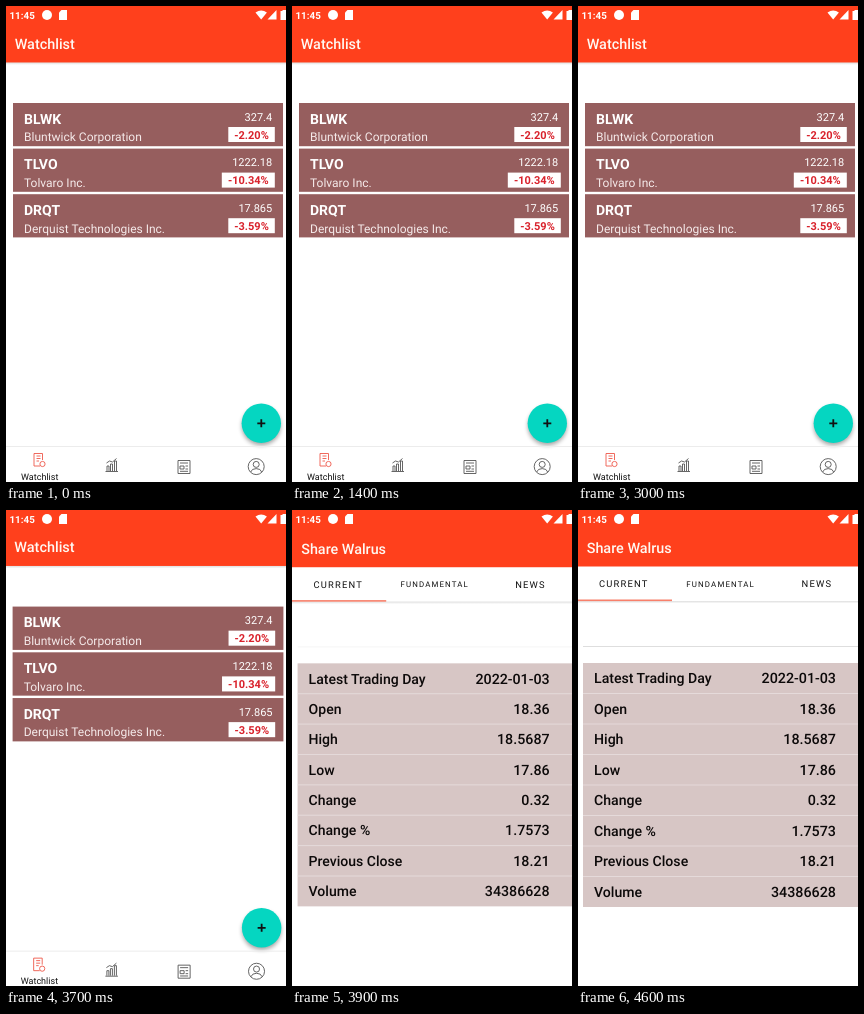
Animation of 280x476 px, one loop 5600 ms. Source, as an HTML page:

```html
<!DOCTYPE html>
<html lang="en">
<head>
<meta charset="utf-8">
<title>Watchlist</title>
<style>
  html, body { margin: 0; width: 100%; height: 100%; overflow: hidden; background: #fff; }
  svg { display: block; width: 280px; height: 476px; font-family: Roboto, sans-serif; text-rendering: geometricPrecision; }
  .bar { fill: #ff401c; }
  .title { font-size: 14.4px; font-weight: 500; fill: #fff8f2; }
  .ticker { font-size: 14px; font-weight: 700; fill: #fff; }
  .company { font-size: 12px; fill: #f5eaea; }
  .price { font-size: 11px; fill: #fff; }
  .badge { font-size: 11px; font-weight: 700; fill: #d9222c; }
  .tab { font-size: 9.4px; letter-spacing: 1.2px; fill: #111; }
  .small { font-size: 7.9px; letter-spacing: 1.15px; }
  .row { font-size: 14.1px; font-weight: 500; fill: #0c0909; }
  .value { font-size: 14.3px; }
  .nav { font-size: 9px; fill: #111; }
  .clock { font-size: 9.8px; font-weight: 700; fill: #fff; }
  .icon { fill: none; stroke: #555; stroke-width: .9; }
</style>
</head>
<body>
<svg viewBox="0 0 280 476">
  <defs>
    <linearGradient id="shade" x2="0" y2="1">
      <stop stop-color="#000" stop-opacity=".13"/>
      <stop offset="1" stop-color="#000" stop-opacity="0"/>
    </linearGradient>
    <filter id="blur" x="-30%" y="-30%" width="160%" height="160%">
      <feGaussianBlur stdDeviation="2"/>
    </filter>
  </defs>
  <g id="list"></g>
  <g id="detail"></g>
  <g fill="#fff">
    <text class="clock" x="3.5" y="12.8">11:45</text>
    <circle cx="41" cy="9" r="5"/>
    <path d="M55.5 4H61V14H53V6.5Z"/>
    <path d="M249.5 6.5Q255.2 2.5 260.9 6.5L255.2 13.5Z"/>
    <path d="M270.5 4V13.5H261.5Z"/>
    <path d="M274.5 5H276.5V4H280V14H274.5Z"/>
  </g>
</svg>
<script>
const list = document.getElementById('list');
const detail = document.getElementById('detail');

const rect = (x, y, w, h, fill) =>
  `<rect x="${x}" y="${y}" width="${w}" height="${h}" fill="${fill}"/>`;
const text = (cls, x, y, value, anchor = 'start') =>
  `<text class="${cls}" x="${x}" y="${y}" text-anchor="${anchor}">${value}</text>`;
const header = name =>
  '<rect class="bar" x="-20" y="-20" width="340" height="76.5"/>' + text('title', 8.7, 42.8, name);

function card([ticker, company, price, change], i) {
  const y = 97 + i * 45.6;
  const w = change.length > 6 ? 53 : 46.5;
  return rect(7, y, 270, 43.2, '#965e5e') +
    text('ticker', 18, y + 20.8, ticker) +
    text('company', 18, y + 38.3, company) +
    text('price', 266.2, y + 17.5, price, 'end') +
    rect(268.8 - w, y + 24, w, 15, '#fff') +
    text('badge', 268.8 - w / 2, y + 35.5, change, 'middle');
}

const stocks = [
  ['BLWK', 'Bluntwick Corporation', '327.4', '-2.20%'],
  ['TLVO', 'Tolvaro Inc.', '1222.18', '-10.34%'],
  ['DRQT', 'Derquist Technologies Inc.', '17.865', '-3.59%']
];

list.innerHTML = header('Watchlist') + rect(-20, 56.5, 340, 2.5, 'url(#shade)') +
  stocks.map(card).join('') + `
  <circle cx="255.3" cy="420" r="19.5" opacity=".35" filter="url(#blur)"/>
  <circle cx="255.3" cy="417.3" r="19.7" fill="#05d6c1"/>
  <path d="M251.3 417.3H259.3M255.3 413.3V421.3" stroke="#111" stroke-width="1.8"/>
  ${rect(-20, 440, 340, 1, '#ececec')}
  <g class="icon">
    <g stroke="#ef5a4c">
      <path d="M36.5 454V447.5H28V460H34M30.5 450H34.5M30.5 452.5H34.5M30.5 455H33"/>
      <circle cx="36.5" cy="458" r="2.6"/>
    </g>
    <path d="M99.5 465.5H112M101 465V460H103V465M104.5 465V458H106.5V465M108.5 465V455H110.5V465M100.5 457L103.5 455L106.5 456L110.5 452.5"/>
    <path d="M172 454.5H184V467.5H172ZM174 457H182M174 460H178V463H174ZM179.5 460H182M179.5 463H182M174 465.3H182"/>
    <circle cx="250.2" cy="460.6" r="8"/>
    <circle cx="250.2" cy="458.4" r="3"/>
    <path d="M244.7 466Q245.7 462.6 250.2 462.6T255.7 466"/>
  </g>` + text('nav', 33.7, 473.7, 'Watchlist', 'middle');

const facts = [
  ['Latest Trading Day', '2022-01-03'], ['Open', '18.36'], ['High', '18.5687'],
  ['Low', '17.86'], ['Change', '0.32'], ['Change %', '1.7573'],
  ['Previous Close', '18.21'], ['Volume', '34386628']
];

detail.innerHTML = header('Share Walrus') +
  text('tab', 21, 77.2, 'CURRENT') +
  text('tab small', 108.3, 76.8, 'FUNDAMENTAL') +
  text('tab', 223.5, 77.2, 'NEWS') +
  rect(-20, 91, 340, 2.5, 'url(#shade)') + rect(-20, 89.5, 114, 1.6, '#f8806b') +
  '<path id="divider" d="M5 136.5H320" stroke="#dedede"/>' +
  rect(5, 153, 315, 244, '#d7c6c5') +
  facts.map(([name, value], i) => {
    const y = 153 + i * 30.5;
    return (i ? rect(5, y - .5, 315, 1, '#e5dada') : '') +
      text('row', 16, y + 20.3, name) + text('row value', 258, y + 20.3, value, 'end');
  }).join('');

const divider = document.getElementById('divider');
const clamp = v => Math.max(0, Math.min(1, v));
const zoom = (node, scale, cx) => node.setAttribute('transform',
  `translate(${cx} 238) scale(${scale}) translate(${-cx} -238)`);

const LOOP = 5600, STEP = 100, PRESS = 3700, OPEN = 3800;

function draw(now) {
  const t = Math.floor(now % LOOP / STEP) * STEP;
  const opened = t >= OPEN;
  list.style.display = opened ? 'none' : '';
  detail.style.display = opened ? '' : 'none';
  zoom(list, t >= PRESS ? 1.003 : 1, 140);
  zoom(detail, 1 - .016 * (1 - clamp((t - OPEN) / 200)) ** 2, 150);
  divider.setAttribute('opacity', .3 + .7 * clamp((t - 4200) / 400));
}

const start = performance.now();
function tick() {
  draw(performance.now() - start);
  requestAnimationFrame(tick);
}
tick();
</script>
</body>
</html>
```
